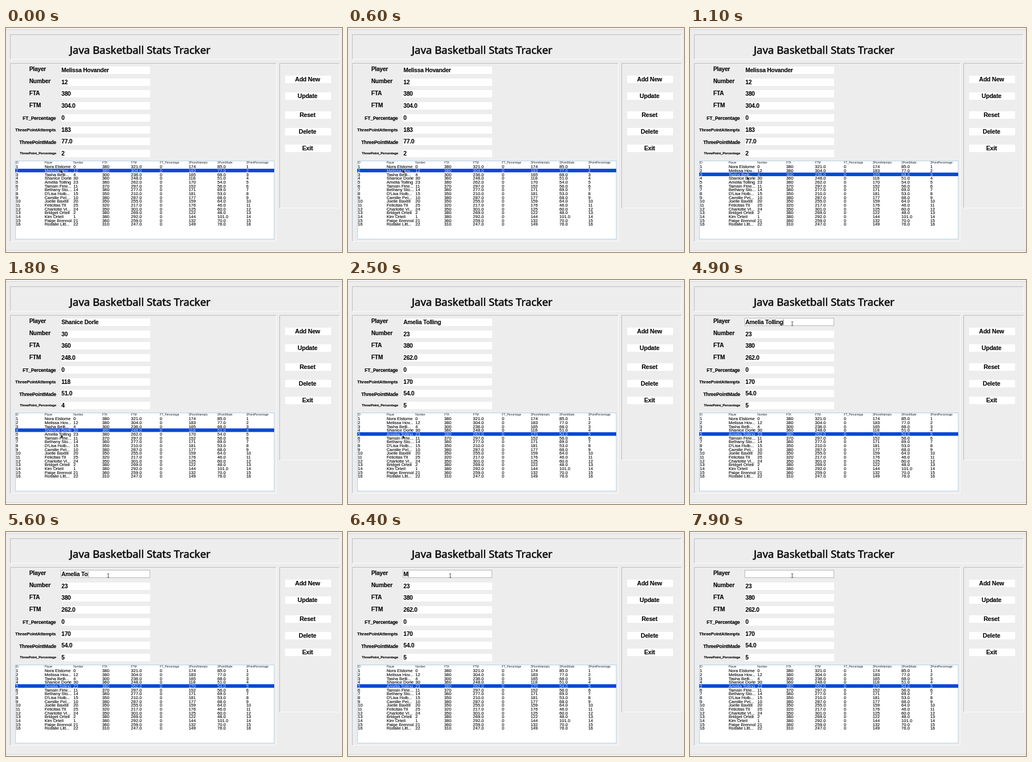
An HTML page that plays this animation: 585x390 px, repeating every 8 s.

```html
<!DOCTYPE html>
<html lang="en">
<head>
<meta charset="utf-8">
<title>Stats Tracker</title>
<style>
  html, body { margin: 0; width: 100%; height: 100%; overflow: hidden; background: #ededed; }
  svg { display: block; width: 585px; height: 390px; font-family: "Liberation Sans", Arial, sans-serif; fill: #080808; }
  text { white-space: pre; }
  .title { font: 18.45px "Noto Sans", "Open Sans", sans-serif; stroke: #080808; stroke-width: .55px; }
  .label, .value, .button { font-weight: bold; letter-spacing: -.02em; stroke: #080808; stroke-width: .15px; }
  .value { font-size: 10.1px; }
  .button { font-size: 10.5px; text-anchor: middle; }
  .head { font-size: 4.9px; fill: #222; }
  .cell { font-size: 7.5px; stroke: #080808; stroke-width: .12px; }
  .selected { fill: #cfdcf8; stroke: none; }
  .box { fill: #fff; }
  .shade { fill: none; stroke: #bdbdbd; }
  .shine { fill: none; stroke: #fafafa; }
</style>
</head>
<body>
<svg id="stage" viewBox="0 0 585 390"></svg>
<script>
const LOOP = 8000;
const ROW_TOP = 238.2, ROW_H = 6.67;
const stage = document.getElementById("stage");

const players = `Nora Elstome,0,380,321,174,85
Melissa Hovander,12,380,304,183,77
Tasha Belli...,4,300,236,165,68
Shanice Dorle,30,360,248,118,51
Amelia Tolling,23,380,262,170,54
Tamsin Firle...,11,370,297,152,56
Bethany Sto...,14,360,277,171,69
D'Lisa Holb...,15,350,210,181,53
Camille Pel...,10,380,287,177,68
Joelle Baxtill,20,350,255,159,64
Felicitas Til,25,320,217,176,46
Charlotte Vi...,24,350,301,125,60
Bridget Ortell,2,380,269,122,48
Kim Ortell,1,380,292,144,101
Paige Brennol,21,360,259,132,70
Rosalie Litt...,22,310,247,149,76`.split("\n").map((line, i) => {
  const [name, num, fta, ftm, tries, made] = line.split(",");
  return [name, num, fta, ftm + ".0", "0", tries, made + ".0", String(i + 1)];
});

function add(tag, attrs, text = "", parent = stage) {
  const el = document.createElementNS("http://www.w3.org/2000/svg", tag);
  for (const key in attrs) el.setAttribute(key, attrs[key]);
  el.textContent = text;
  parent.append(el);
  return el;
}
const rect = (x, y, width, height, attrs) => add("rect", { x, y, width, height, ...attrs });
const write = (x, y, text, cls, size) =>
  add("text", { x, y, class: cls, ...(size && { style: `font-size:${size}px` }) }, text);

// Sunken bevel: dark top and left, light bottom and right
function panel(x, y, w, h) {
  add("path", { d: `M${x} ${y + h}V${y}H${x + w}`, class: "shade" });
  add("path", { d: `M${x} ${y + h}H${x + w}V${y}`, class: "shine" });
}

// Window and panels
rect(0, 0, 585, 390, { fill: "#ededed" });
rect(0, 0, 585, 2, { fill: "#f8f8f8" });
rect(0, 2, 585, 1, { fill: "#d2d2d2" });
rect(0, 387, 585, 1, { fill: "#d2d2d2" });
rect(0, 388, 585, 2, { fill: "#f8f8f8" });
panel(7.5, 11.5, 573, 43);
panel(7.5, 61.5, 463, 310);
panel(476.5, 61.5, 104, 252);
write(111, 45, "Java Basketball Stats Tracker", "title");

// Form: label, x, baseline, font size
const fields = [
  ["Player", 40.5, 75.3, 10.1],
  ["Number", 40.5, 96, 10.1],
  ["FTA", 40.5, 117, 10.1],
  ["FTM", 40.5, 138, 10.1],
  ["FT_Percentage", 29, 160, 8.4],
  ["ThreePointAttempts", 16, 180, 7.7],
  ["ThreePointMade", 23, 201.7, 8.6],
  ["ThreePoint_Percentage", 24, 220, 5.9],
].map(([label, x, y, size], i) => {
  const top = 67 + i * 20.7;
  write(x, y, label, "label", size);
  rect(96, Math.round(top), 155, 13, { class: "box" });
  return write(96.5, top + 10, "", "value");
});
const ring = rect(95.5, 66.5, 155, 13, { fill: "none", stroke: "#b6babf" });
const caret = rect(0, 68.5, 0.7, 10, { fill: "#333" });

// Buttons
["Add New", "Update", "Reset", "Delete", "Exit"].forEach((name, i) => {
  const top = 83 + i * 29 + (i > 1 ? 4 : 0);
  rect(486, top, 80, 13, { class: "box" });
  write(525, top + 10, name, "button");
});

// Table
rect(16.5, 231.5, 450.5, 136, { class: "box", stroke: "#b4d3ea" });
const band = rect(16, 0, 451, 6.2, { fill: "#0848d6" });
const columnX = i => 17 + i * 50.15;
["ID", "Player", "Number", "FTA", "FTM", "FT_Percentage", "3PointAttempts", "3PointMade", "3PointPercentage"]
  .forEach((name, i) => write(columnX(i), 236, name, "head"));
const rows = players.map((player, r) => {
  const group = add("g", { class: "cell" });
  const name = player[0].length > 15 ? player[0].slice(0, 11) + "..." : player[0];
  [r + 1, name, ...player.slice(1)].forEach((text, c) =>
    add("text", { x: columnX(c), y: ROW_TOP + r * ROW_H + 6 }, text, group));
  return group;
});

// Pointers
const arrow = add("path", {
  d: "M0 0V7L1.6 5.5L2.8 8L4 7.5L2.9 5.1H5Z", stroke: "#fff", "stroke-width": 0.5,
});
const beam = add("path", {
  d: "M-1.6-3.5Q0-3.5 0-2.5Q0-3.5 1.6-3.5M0-2.5V2.5M-1.6 3.5Q0 3.5 0 2.5Q0 3.5 1.6 3.5",
  fill: "none", stroke: "#222", "stroke-width": 0.8,
});

// Time, x, y
const path = [
  [0, 95, 246], [700, 95, 246], [1000, 99, 258], [1400, 99, 259],
  [1900, 95, 270], [2800, 95, 270], [3500, 178, 76], [LOOP, 178, 76],
];

function pointerAt(t) {
  const i = path.findIndex(p => p[0] > t);
  const [t0, x0, y0] = path[i - 1], [t1, x1, y1] = path[i];
  const u = (t - t0) / (t1 - t0), k = u * u * (3 - 2 * u);
  return [x0 + (x1 - x0) * k, y0 + (y1 - y0) * k];
}

// Last value whose start time has passed
const valueAt = (steps, t) => steps.filter(s => s[0] <= t).pop()[1];
const selection = [[0, 1], [900, 2], [1500, 3], [1900, 4]];
const shown = [[0, 1], [1250, 2], [1650, 3], [2050, 4]];

function nameAt(t, name) {
  if (t < 5400) return name;
  if (t < 6300) return name.slice(0, Math.max(0, name.length - 1 - Math.floor((t - 5400) / 50)));
  return t < 7200 ? "M" : "";
}

function setText(el, text) {
  if (el.textContent !== text) el.textContent = text;
}
const show = (el, on) => el.setAttribute("visibility", on ? "visible" : "hidden");

function draw(now) {
  const t = now % LOOP;
  const chosen = valueAt(selection, t);
  band.setAttribute("y", ROW_TOP + chosen * ROW_H + 0.2);
  rows.forEach((row, i) => row.classList.toggle("selected", i === chosen));

  const player = players[valueAt(shown, t)];
  fields.forEach((field, i) => setText(field, i ? player[i] : nameAt(t, player[0])));

  const focused = t >= 4700;
  show(ring, focused);
  show(caret, focused && (t < 7200 ? (t - 4700) % 1000 < 500 || t >= 5400 : t < 7600));
  caret.setAttribute("x", 97 + fields[0].getComputedTextLength());

  const [x, y] = pointerAt(t);
  const overText = x > 96 && y < 82;
  show(arrow, !overText);
  show(beam, overText);
  for (const el of [arrow, beam]) el.setAttribute("transform", `translate(${x} ${y})`);
}

function tick() {
  draw(performance.now());
  requestAnimationFrame(tick);
}
tick();
</script>
</body>
</html>
```
